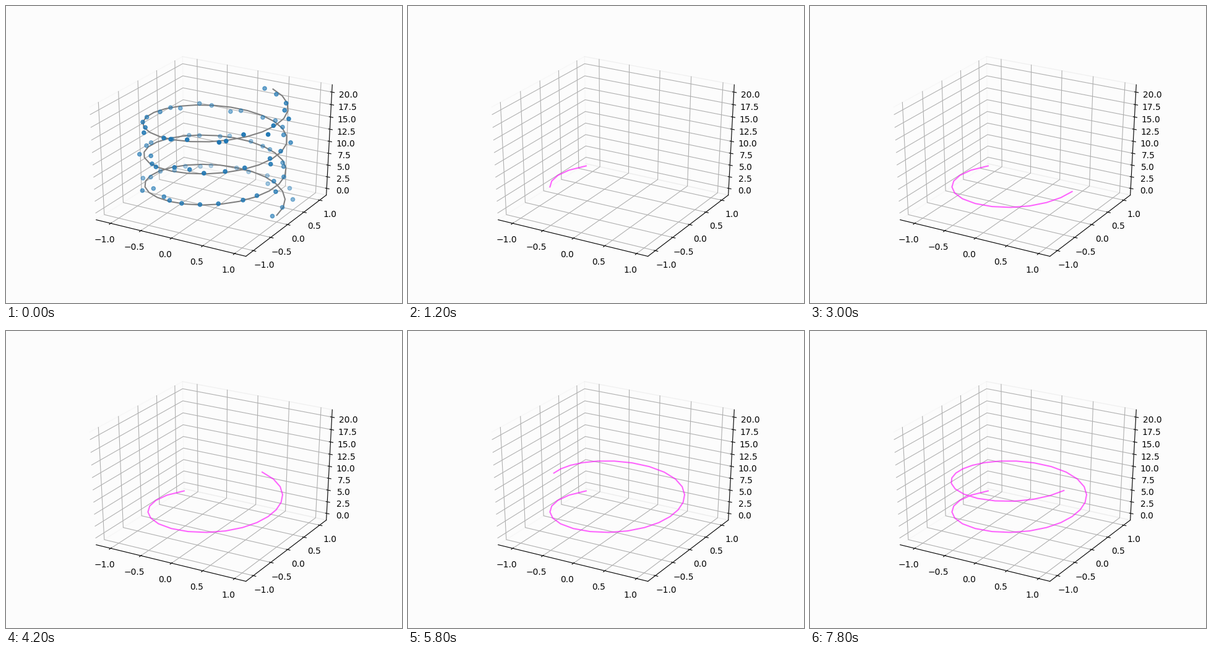
A matplotlib script for the animation above (8 s loop, 640 by 480 pixels).

```python
import numpy as np
import matplotlib.pyplot as plt
from matplotlib.animation import FuncAnimation

W, H = 640, 480
FRAMES = 40
E = 0.5 + 1 / 48          # half size of the drawn box
TICK = 1 / 12             # unit for tick lengths
PAD = 0.0738              # distance of tick labels from the box
LIMITS = ((-1.197, 1.126), (-1.160, 1.168), (-1, 21))

fig = plt.figure(figsize=(W / 100, H / 100), dpi=100, facecolor="#fcfcfc")
ax = fig.add_axes([0, 0, 1, 1])
ax.set_xlim(0, W)
ax.set_ylim(H, 0)
ax.axis("off")


def unit(axis, value):
    """Data value to box coordinate, centred on zero."""
    lo, hi = LIMITS[axis]
    return (value - lo) / (hi - lo) - 0.5


def to_box(x, y, z):
    return np.array([unit(0, x), unit(1, y), unit(2, z)])


def depth(p):
    """Distance from the eye: azimuth -60, elevation 30."""
    return 10 - (0.4330127 * p[0] - 0.75 * p[1] + 0.5 * p[2])


def project(p):
    d = depth(p)
    right = (0.8660254 * p[0] + 0.5 * p[1]) / d
    up = (-0.25 * p[0] + 0.4330127 * p[1] + 0.8660254 * p[2]) / d
    return 80 + 496 * (right + 0.095) / 0.185, 427.2 - 369.6 * (up + 0.095) / 0.185


def path(points, **style):
    x, y = project(np.array(points, float).T)
    return ax.plot(x, y, **style)[0]


def moved(base, index, value):
    p = list(base)
    p[index] = value
    return p


def draw_box():
    panes = (
        (0.95, [(-E, -E, -E), (-E, E, -E), (-E, E, E), (-E, -E, E)]),
        (0.90, [(-E, E, -E), (E, E, -E), (E, E, E), (-E, E, E)]),
        (0.925, [(-E, -E, -E), (E, -E, -E), (E, E, -E), (-E, E, -E)]),
    )
    for shade, corners in panes:
        path(corners, color=(shade,) * 3, alpha=0.5, lw=1, zorder=1)


def draw_axis(axis, start, end, ticks, tick_dir, sign):
    path([start, end], color="k", lw=0.8, zorder=2)
    for value in ticks:
        t = unit(axis, value)
        corner = moved((-E, E, -E), axis, t)
        a, b = (axis + 1) % 3, (axis + 2) % 3
        path([moved(corner, a, -corner[a]), corner, moved(corner, b, -corner[b])],
             color="#b0b0b0", lw=0.8, zorder=2)

        base = moved(start, axis, t)
        path([moved(base, tick_dir, base[tick_dir] + sign * k * TICK)
              for k in (-0.1, 0.2)], color="k", lw=0.8, zorder=2.2)

        label = [c if i == axis else c + np.sign(c) * PAD
                 for i, c in enumerate(base)]
        x, y = project(label)
        ax.text(x, y, f"{value:.1f}".replace("-", "\u2212"), fontsize=10,
                family="DejaVu Sans", ha="center", va="top")


draw_box()
halves = np.arange(-1, 1.1, 0.5)
draw_axis(0, (-E, -E, -E), (E, -E, -E), halves, 1, -1)
draw_axis(1, (E, E, -E), (E, -E, -E), halves, 0, 1)
draw_axis(2, (E, E, -E), (E, E, E), np.arange(0, 20.1, 2.5), 0, 1)

# True helix and noisy samples of it
z = np.linspace(0, 20, 80)
curve = path(to_box(np.cos(z), np.sin(z), z).T, color="gray", lw=1.5, zorder=3)

rng = np.random.default_rng(4)
noise = rng.normal(0, 0.06, (2, len(z)))
samples = to_box(np.cos(z) + noise[0], np.sin(z) + noise[1], z)
samples = samples[:, np.argsort(-depth(samples))]

# Far samples fade
far = depth(samples)
colors = np.tile([0x1f / 255, 0x77 / 255, 0xb4 / 255, 1], (len(z), 1))
colors[:, 3] = 1 - 0.7 * (far - far.min()) / np.ptp(far)
cloud = ax.scatter(*project(samples), s=20, c=colors, zorder=4)

# Estimated track: a slightly oval helix that runs ahead and settles early on
k = np.arange(FRAMES - 2)
track_z = z[10 + k]
oval = 0.04 * np.cos(2 * (track_z + 0.275 - 0.4))
theta = track_z + 0.275 - oval - 0.23 * np.exp(-0.57 * k)
radius = 0.99 - oval
track = project(to_box(radius * np.cos(theta), radius * np.sin(theta), track_z))
trail, = ax.plot([], [], color="magenta", alpha=0.6, lw=1.5, zorder=3)


def draw(frame):
    intro = frame == 0
    curve.set_visible(intro)
    cloud.set_visible(intro)
    shown = max(frame - 1, 0)
    trail.set_data(track[0][:shown], track[1][:shown])
    return curve, cloud, trail


anim = FuncAnimation(fig, draw, frames=FRAMES, interval=200, repeat=True,
                     repeat_delay=0, init_func=lambda: draw(0))
plt.show()
```
